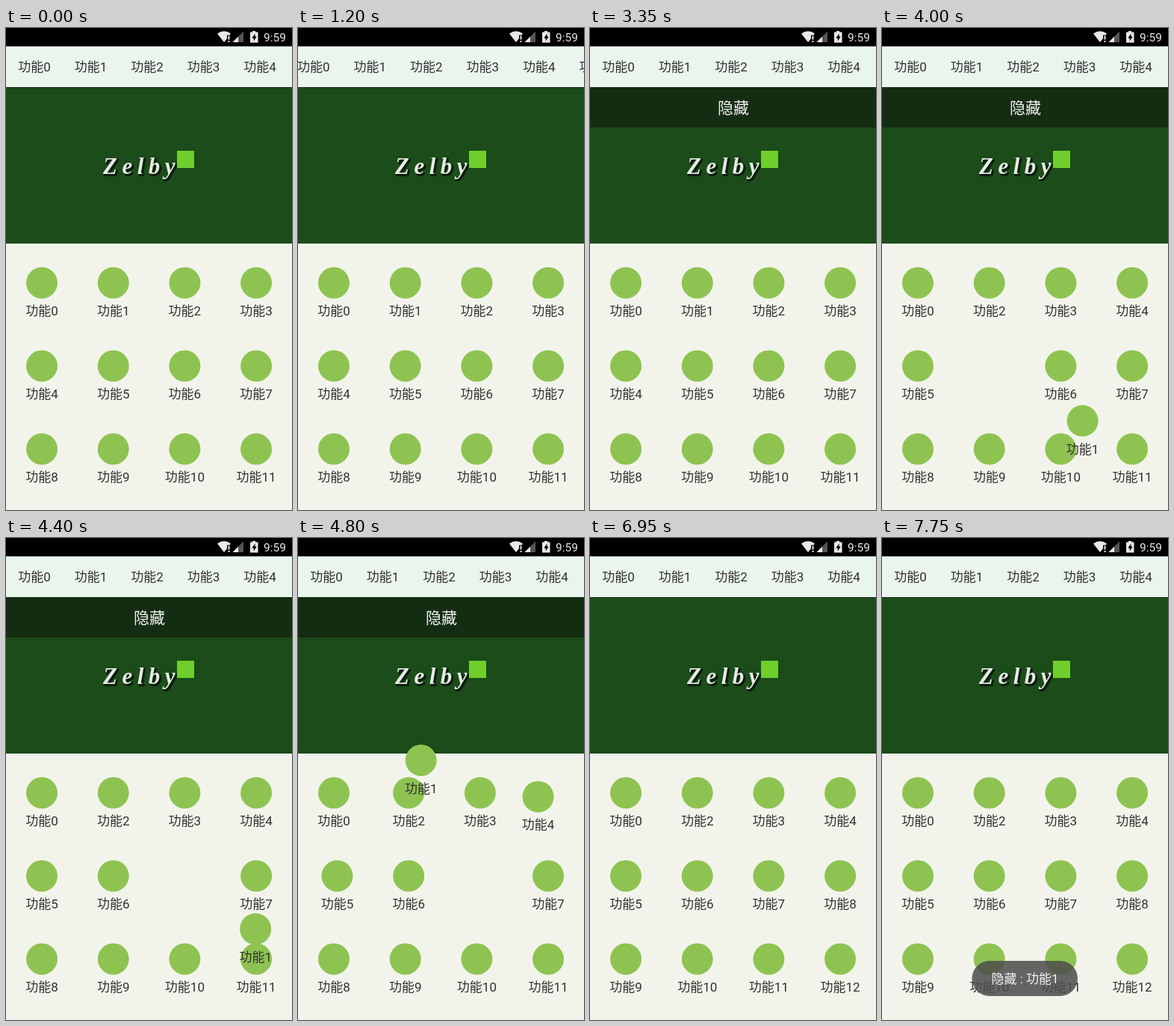
An HTML page that plays this animation: 383x644 px, repeating every 8000 ms.

```html
<!DOCTYPE html>
<html lang="zh">
<head>
<meta charset="utf-8">
<title>Drag grid</title>
<style>
  html, body { margin: 0; width: 100%; height: 100%; overflow: hidden; background: #f2f4eb; }
  svg { display: block; width: 100%; height: 100%; }
  text { font-family: Roboto, "Noto Sans CJK SC", "Noto Sans CJK", sans-serif; text-anchor: middle; }
  .label { font-size: 17px; fill: #303030; }
  .word { font: italic bold 31px "Liberation Serif", serif; letter-spacing: 6.5px; text-anchor: start; }
</style>
</head>
<body>
<svg viewBox="0 0 383 644">
  <defs>
    <radialGradient id="board" gradientUnits="userSpaceOnUse" r="1"
        gradientTransform="translate(150 140) scale(255 195)">
      <stop offset="0" stop-color="#4f8050"/>
      <stop offset=".35" stop-color="#3c6e3d"/>
      <stop offset=".7" stop-color="#295c2a"/>
      <stop offset="1" stop-color="#1b4c1a"/>
    </radialGradient>
  </defs>
  <rect width="383" height="644" fill="#f2f4eb"/>

  <rect y="24" width="383" height="55" fill="#eaf5ec"/>
  <g id="tabs"></g>

  <rect y="79" width="383" height="209" fill="url(#board)"/>
  <rect y="79" width="383" height="1" fill="#14240f"/>
  <text class="word" x="132" y="197" fill="#0d1f0e" stroke="#0d1f0e" stroke-width="2">Zelby</text>
  <text class="word" x="130" y="195" fill="#e6ebe4">Zelby</text>
  <rect x="229" y="164" width="23" height="23" fill="#6fce2c"/>

  <g id="bar">
    <rect y="80" width="383" height="53" fill="#0f160e" fill-opacity=".56"/>
    <text x="192" y="113.7" font-size="21" fill="#f4f4f4">隐藏</text>
  </g>

  <g id="grid"></g>

  <g id="toast">
    <rect x="120.5" y="565" width="141.5" height="47" rx="23.5" fill="#4d4d4d" fill-opacity=".86"/>
    <text x="191.5" y="595" font-size="17" fill="#f2f2f2">隐藏 : 功能1</text>
  </g>

  <rect width="383" height="24.5" fill="#000"/>
  <g fill="#e9e9e9">
    <path d="M283 7.5Q292 1 301 7.5L299.5 9.5H296V14L292 19Z"/>
    <path d="M297.5 10.5h2v5h-2zM297.5 17h2v2h-2z"/>
    <path d="M318 4.5V19H303.5Z" fill="#555"/>
    <path d="M311 11.5V19H303.5Z"/>
    <path d="M330 4h4v1.5h3.5V19.5H327V5.5h3z"/>
    <path d="M333.5 7.5 329.3 13.5h2.4v4l4-6h-2.2z" fill="#000"/>
    <text x="360" y="17.5" font-size="15.5">9:59</text>
  </g>
</svg>
<script>
const LOOP = 8000, STEP = 50, SHIFT = 230;
const GRAB = 3350, DROP = 6950;

const $ = id => document.getElementById(id);
const ramp = (t, from, to) => Math.max(0, Math.min(1, (t - from) / (to - from)));
const ease = p => (1 - Math.cos(Math.PI * p)) / 2;
const mix = (a, b, p) => a + (b - a) * p;
const show = (el, on) => { el.style.display = on ? '' : 'none'; };
const move = (el, x, y) => el.setAttribute('transform', `translate(${x.toFixed(2)} ${y.toFixed(2)})`);
const slot = n => [48 + 95.7 * (n % 4), 111 * Math.floor(n / 4)];

function add(parent, tag, attrs, text = '') {
  const el = document.createElementNS('http://www.w3.org/2000/svg', tag);
  for (const k in attrs) el.setAttribute(k, attrs[k]);
  el.textContent = text;
  return parent.appendChild(el);
}

for (let i = 0; i < 9; i++)
  add($('tabs'), 'text', { class: 'label', x: 38 + 75.5 * i, y: 58.4 }, '功能' + i);

const items = Array.from({ length: 13 }, (_, i) => {
  const g = add($('grid'), 'g', {});
  add(g, 'circle', { cy: 340.5, r: 21, fill: '#8ec351' });
  add(g, 'text', { class: 'label', y: 384.2 }, '功能' + i);
  return g;
});
const held = items[1];
$('grid').append(held);

// Items up to the empty slot close up by one place
const place = (i, gap) => slot(i > 1 && i <= gap ? i - 1 : i);

// The empty slot moves to the cell under the held item
const gapMoves = [
  { at: 3640, from: 1, to: 5 },
  { at: 4020, from: 5, to: 6 },
  { at: 4768, from: 6, to: 1 },
];

// Down to the lower right, back up past its cell, then onto the bar
function dragOffset(t) {
  const out = ramp(t, 3400, 4200), up = ramp(t, 5550, 6000) ** 1.2;
  return [
    222 * out ** 2 - 201 * ease(ramp(t, 4260, 4800)) + 68 * up,
    216 * ease(out) - 266 * ease(ramp(t, 4260, 4860)) - 189 * up,
  ];
}

function draw(t) {
  const dropped = t >= DROP;
  move($('tabs'), -120 * (ramp(t, 1150, 1500) - ramp(t, 1750, 1850)), 0);
  show($('bar'), t >= GRAB && !dropped);
  show(held, !dropped);

  const { at, from, to } = gapMoves.findLast(m => m.at <= t) || gapMoves[0];
  const p = ease(ramp(t, at, at + SHIFT));
  items.forEach((el, i) => {
    const a = place(i, dropped ? items.length : from);
    const b = place(i, dropped ? items.length : to);
    move(el, mix(a[0], b[0], p), mix(a[1], b[1], p));
  });
  const [dx, dy] = dragOffset(t), home = slot(1);
  move(held, home[0] + dx, home[1] + dy);

  $('toast').setAttribute('opacity', ramp(t, 7300, 7750));
}

const origin = performance.now();
function tick() {
  const t = (performance.now() - origin) % LOOP;
  draw(Math.floor(t / STEP) * STEP);
  requestAnimationFrame(tick);
}
tick();
</script>
</body>
</html>
```
